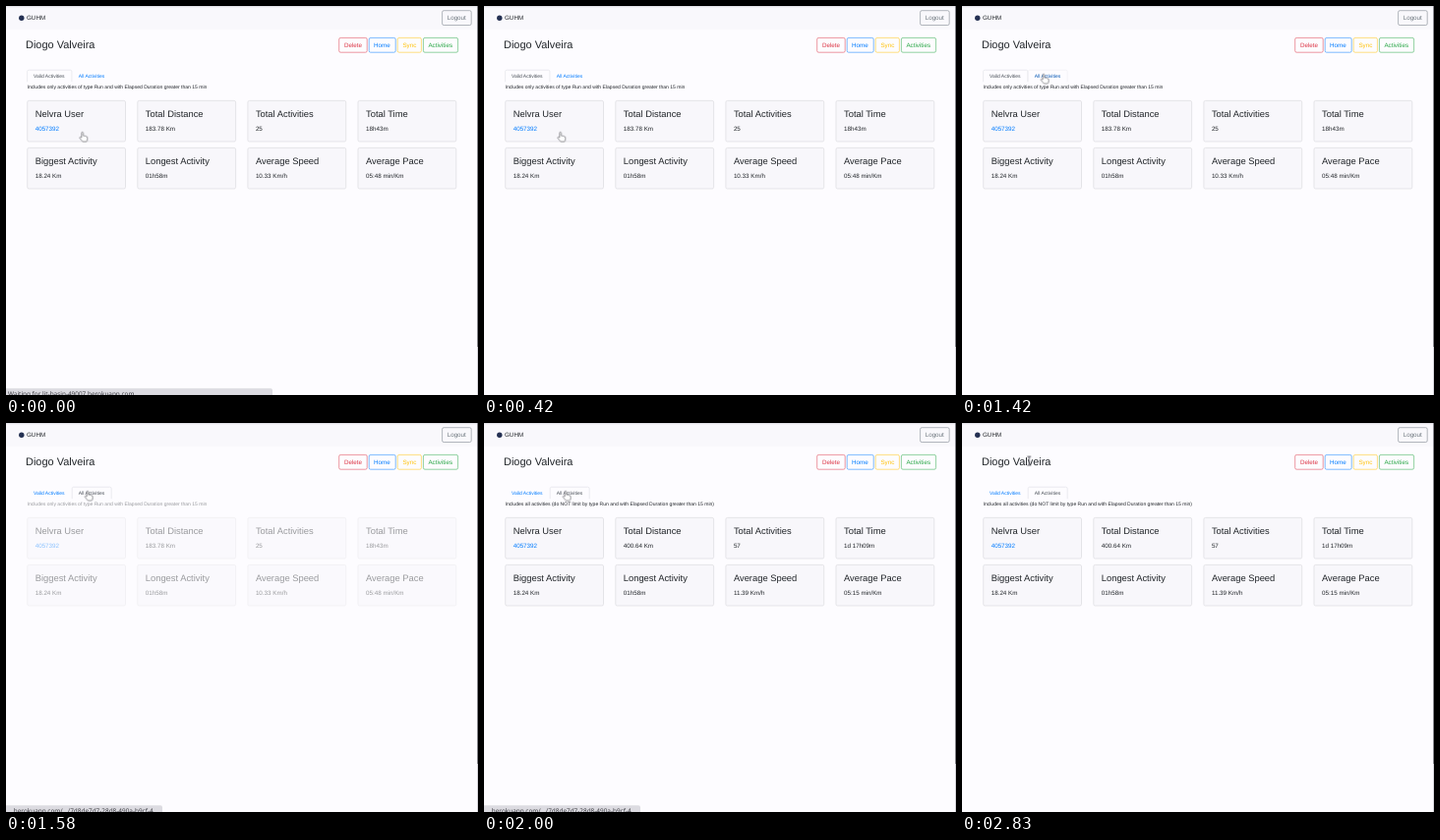
Animation, 480 px wide and 396 px high, one loop 3.01 s. Source, as an HTML page:

```html
<!DOCTYPE html>
<html lang="en">
<head>
<meta charset="utf-8">
<title>Run dashboard</title>
<style>
  html, body { margin: 0; width: 100%; height: 100%; overflow: hidden; background: #fdfcff; }
  svg { display: block; width: 480px; height: 396px; }
  text { font: 6.26px "Liberation Sans", Arial, sans-serif; fill: #212529; text-rendering: geometricPrecision; }
  .name { font-size: 10.96px; }
  .head { font-size: 9.37px; }
  .small { font-size: 5px; }
  .note { font-size: 5.06px; }
  .status { font: 6.42px "Noto Sans", sans-serif; fill: #3c3c42; }
  .link { fill: #007bff; }
  .card { fill: #f8f7fb; stroke: #dcdbe0; stroke-width: .7; }
  .tab { fill: #fdfcff; stroke: #dddfe4; stroke-width: .6; }
  .btn rect { fill: none; stroke-width: .6; stroke-opacity: .85; }
  .cursor { fill: #fff; stroke: #66666c; stroke-width: .7; stroke-linejoin: round; }

  .anim { animation: 3010ms step-end infinite; }
  #wait { animation-name: wait; }
  #url { animation-name: url; }
  #valid { animation-name: valid; }
  #all { animation-name: all; }
  #tabValid { animation-name: tabValid; }
  #tabAll { animation-name: tabAll; }
  #boxValid { animation-name: boxValid; }
  #boxAll { animation-name: boxAll; }
  #hand { animation-name: hand; }
  #beam { animation-name: beam; }
  #arrow { animation-name: arrow; }

  @keyframes wait { 0% { opacity: 1 } 5.648% { opacity: .2 } 13.953%, 100% { opacity: 0 } }
  @keyframes url { 0% { opacity: 0 } 52.492% { opacity: 1 } 94.02%, 100% { opacity: 0 } }
  @keyframes valid { 0% { opacity: 1 } 52.492% { opacity: .45 } 60.797%, 100% { opacity: 0 } }
  @keyframes all { 0% { opacity: 0 } 60.797% { opacity: .75 } 66.445%, 100% { opacity: 1 } }
  @keyframes tabValid { 0% { fill: #495057 } 52.492%, 100% { fill: #007bff } }
  @keyframes tabAll { 0% { fill: #007bff } 38.87% { fill: #0056b3 } 52.492%, 100% { fill: #495057 } }
  @keyframes boxValid { 0% { opacity: 1 } 52.492%, 100% { opacity: 0 } }
  @keyframes boxAll { 0% { opacity: 0 } 38.87% { opacity: .5 } 52.492%, 100% { opacity: 1 } }
  @keyframes hand {
    0% { opacity: 1; transform: translate(74.3px, 127.8px) }
    27.575% { opacity: 0; transform: translate(81.7px, 71px) }
    38.87% { opacity: 1; transform: translate(81.7px, 71px) }
    47.176% { opacity: 1; transform: translate(79.6px, 68.7px) }
    72.093% { opacity: 1; transform: translate(78.3px, 66px) }
    80.399%, 100% { opacity: 0; transform: translate(78.3px, 66px) }
  }
  @keyframes beam {
    0% { opacity: 0; transform: translate(74px, 99px) }
    27.575% { opacity: 1; transform: translate(74px, 99px) }
    33.223% { opacity: 0; transform: translate(68.5px, 35px) }
    85.714% { opacity: 1; transform: translate(68.5px, 35px) }
    94.02%, 100% { opacity: 1; transform: translate(68.3px, 33.5px) }
  }
  @keyframes arrow {
    0% { opacity: 0; transform: translate(74.5px, 80px) }
    33.223% { opacity: 1; transform: translate(74.5px, 80px) }
    38.87% { opacity: 0; transform: translate(76px, 54px) }
    80.399% { opacity: 1; transform: translate(76px, 54px) }
    85.714%, 100% { opacity: 0; transform: translate(76px, 54px) }
  }
</style>
</head>
<body>
<svg viewBox="0 0 480 396">
  <rect width="480" height="396" fill="#fdfcff"/>
  <rect width="480" height="24" fill="#f9f8fc"/>
  <rect width="480" height="1.3" fill="#e6e5eb"/>
  <circle cx="15.8" cy="12.2" r="2.7" fill="#243052"/>
  <text x="21" y="14.2">GUHM</text>
  <text class="name" x="20" y="42.8">Diogo Valveira</text>
  <g id="buttons"></g>

  <path id="boxValid" class="tab anim" d="M21.6 77.2V66.8q0-1.6 1.6-1.6H65.3q1.6 0 1.6 1.6V77.2"/>
  <path id="boxAll" class="tab anim" d="M67.2 77.2V66.8q0-1.6 1.6-1.6H105.6q1.6 0 1.6 1.6V77.2"/>
  <text id="tabValid" class="small anim" x="28" y="73.2">Valid Activities</text>
  <text id="tabAll" class="small anim" x="73.8" y="73.2">All Activities</text>

  <g id="valid" class="anim"></g>
  <g id="all" class="anim"></g>

  <g id="wait" class="anim">
    <path d="M0 389.3H269q2 0 2 2V396H0Z" fill="#dcdbe1"/>
    <text class="status" x="2" y="396.9">Waiting for lit-basin-49007.herokuapp.com</text>
  </g>
  <g id="url" class="anim">
    <path d="M0 389.3H157q2 0 2 2V396H0Z" fill="#dcdbe1"/>
    <text class="status" x="7.8" y="396.9">herokuapp.com/.../7d8de7d7-28d8-490a-b9cf-4</text>
  </g>
  <rect x="479.2" width=".8" height="347" fill="#6c6c74"/>
  <rect x="479.2" y="347" width=".8" height="49" fill="#d0cfd6"/>

  <path id="hand" class="cursor anim" d="M2.6 6V1.4Q2.7.5 3.4.5T4.2 1.4V4.2Q5.2 3.8 5.7 4.5Q6.7 4.2 7.1 5Q8.5 4.9 8.5 6.2V8Q8.4 9.2 7.6 10.2H3.6Q2.4 8.6.7 6.6Q.5 5.5 1.6 5.6Z"/>
  <path id="beam" class="anim" d="M-1.8.6Q-.2.6 0 1.4Q.2.6 1.8.6M0 1.4V8.8M-1.8 9.6Q-.2 9.6 0 8.8Q.2 9.6 1.8 9.6" fill="none" stroke="#6b6b72" stroke-width="1.1"/>
  <path id="arrow" class="cursor anim" d="M.5.6V8.4L2.3 6.8L3.6 9.6L4.8 9L3.6 6.3H6Z"/>
</svg>
<script>
  const $ = id => document.getElementById(id);
  const text = (x, y, s, cls = "", style = "") =>
    `<text x="${x}" y="${y}" class="${cls}" style="${style}">${s}</text>`;

  // label, box x, box y, box width, text x, colour
  const buttons = [
    ["Delete", 338.7, 32.4, 28.5, 343.9, "#dc3545"],
    ["Home", 369.2, 32.4, 27, 374, "#007bff"],
    ["Sync", 398.2, 32.4, 24.2, 403.4, "#ffc107"],
    ["Activities", 424.4, 32.4, 35.2, 429.4, "#28a745"],
    ["Logout", 443.6, 4.7, 29.6, 448.7, "#6c757d"]
  ];
  $("buttons").innerHTML = buttons.map(([s, x, y, w, tx, c]) =>
    `<g class="btn"><rect x="${x}" y="${y}" width="${w}" height="14.8" rx="1.6" stroke="${c}"/>` +
    text(tx, y + 9.2, s, "", "fill:" + c) + "</g>").join("");

  const heads = ["Nelvra User", "Total Distance", "Total Activities", "Total Time",
    "Biggest Activity", "Longest Activity", "Average Speed", "Average Pace"];

  function panel(id, note, values) {
    const cards = heads.map((head, i) => {
      const x = 21.7 + i % 4 * 112.1, y = 96.4 + (i > 3 ? 48 : 0);
      return `<rect class="card" x="${x}" y="${y}" width="99.8" height="41.6" rx="1.6"/>` +
        text(x + 8, y + 16.9, head, "head") +
        text(x + 8, y + 30.1, values[i], i ? "" : "link");
    });
    $(id).innerHTML = text(21.5, 83.9, note, "note") + cards.join("");
  }

  panel("valid", "Includes only activities of type Run and with Elapsed Duration greater than 15 min",
    ["4057392", "183.78 Km", "25", "18h43m", "18.24 Km", "01h58m", "10.33 Km/h", "05:48 min/Km"]);
  panel("all", "Includes all activities (do NOT limit by type Run and with Elapsed Duration greater than 15 min)",
    ["4057392", "400.64 Km", "57", "1d 17h09m", "18.24 Km", "01h58m", "11.39 Km/h", "05:15 min/Km"]);
</script>
</body>
</html>
```
